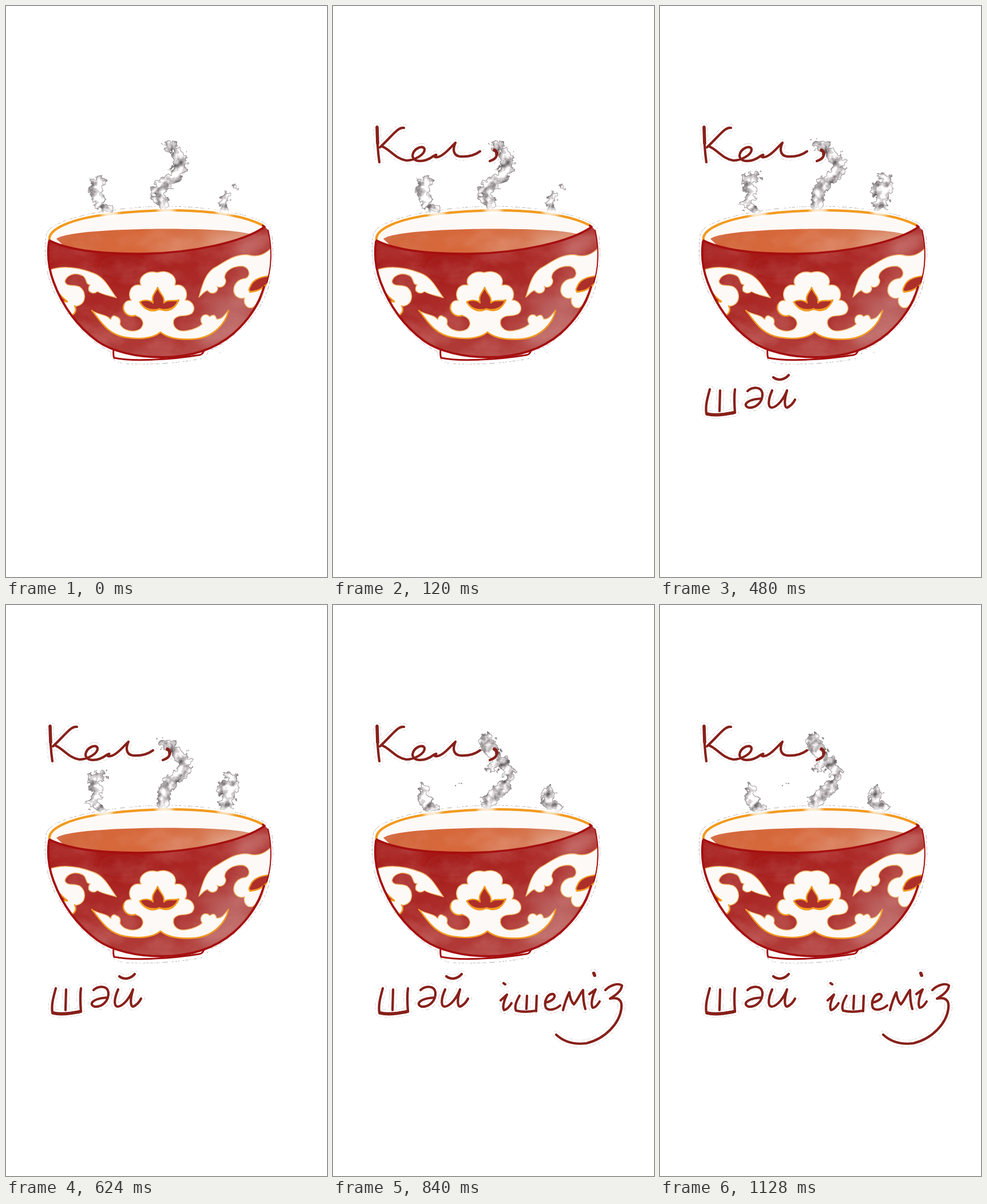
Recreate the animation shown at these times as an HTML page without scripts. Size 561x998 px, loop 1320 ms.

```html
<!DOCTYPE html>
<html lang="kk">
<head>
<meta charset="utf-8">
<title>Кел, шәй ішеміз</title>
<style>
html, body { margin: 0; width: 100%; height: 100%; overflow: hidden; background: #fff; }
svg { display: block; width: 100%; height: 100%; }
path { fill: none; stroke-linecap: round; stroke-linejoin: round; }
.solid path { fill: inherit; }
.ink { stroke: #87201a; stroke-width: 4.2; }
.bold { stroke-width: 5.6; }
.edge { stroke: #bbb3b3; stroke-width: 13.2; }
.gap { stroke: #fff; stroke-width: 12.2; }
.gold { stroke: #f29a1f; stroke-width: 2.4; }
.peach { stroke: #f3b96c; stroke-width: 1.5; }
.rim { stroke: #a50f10; stroke-width: 3.8; }
.steam path { stroke: #aaa; stroke-width: 23; }
.steam .s { stroke-width: 15; }
.steam .m { stroke-width: 28; }
.steam .dot { stroke-width: 4; }

/* hard cuts at 120, 480, 720 and 840 ms */
.p1, .p2, .p3, .p4, .w1, .w2 { animation: 1.32s step-end infinite; }
.p1 { animation-name: p1; }
.p2 { animation-name: p2; }
.p3 { animation-name: p3; }
.p4 { animation-name: from840; }
.w1 { animation-name: from120; }
.w2 { animation-name: from480; }
@keyframes p1 { 0% { opacity: 1 } 36.36%, to { opacity: 0 } }
@keyframes p2 { 0% { opacity: 0 } 36.36% { opacity: 1 } 54.54%, to { opacity: 0 } }
@keyframes p3 { 0% { opacity: 0 } 54.54% { opacity: 1 } 63.63%, to { opacity: 0 } }
@keyframes from120 { 0% { opacity: 0 } 9.09%, to { opacity: 1 } }
@keyframes from480 { 0% { opacity: 0 } 36.36%, to { opacity: 1 } }
@keyframes from840 { 0% { opacity: 0 } 63.63%, to { opacity: 1 } }
</style>
</head>
<body>
<svg viewBox="0 0 561 998" preserveAspectRatio="none" role="img" aria-label="Кел, шәй ішеміз">
<defs>
  <linearGradient id="tea" x1="0" x2="1" y1="0" y2=".15">
    <stop offset="0" stop-color="#d2683d"/><stop offset=".5" stop-color="#d7683a"/>
    <stop offset=".75" stop-color="#d6764f"/><stop offset="1" stop-color="#d6805c"/>
  </linearGradient>
  <linearGradient id="clay" x1=".3" y1="0" x2=".75" y2="1">
    <stop offset="0" stop-color="#a51715"/><stop offset=".45" stop-color="#ab2926"/>
    <stop offset="1" stop-color="#b34441"/>
  </linearGradient>
  <filter id="soft" x="-60%" y="-60%" width="220%" height="220%"><feGaussianBlur stdDeviation="12"/></filter>
  <filter id="haze" x="-60%" y="-90%" width="220%" height="280%"><feGaussianBlur stdDeviation="3"/></filter>
  <filter id="wash" x="0" y="0" width="1" height="1" color-interpolation-filters="sRGB">
    <feTurbulence type="fractalNoise" baseFrequency=".013 .02" numOctaves="5" seed="8"/>
    <feColorMatrix values="0 0 0 0 .94  0 0 0 0 .8  0 0 0 0 .78  1.5 0 0 0 -.62"/>
  </filter>
  <filter id="broken" filterUnits="userSpaceOnUse" x="50" y="190" width="480" height="600">
    <feTurbulence type="fractalNoise" baseFrequency=".3" numOctaves="1" seed="5"/>
    <feColorMatrix values="0 0 0 0 0  0 0 0 0 0  0 0 0 0 0  9 0 0 0 -4.1" result="holes"/>
    <feComposite in="SourceGraphic" in2="holes" operator="in"/>
  </filter>
  <filter id="puff" filterUnits="userSpaceOnUse" x="120" y="190" width="310" height="185" color-interpolation-filters="sRGB">
    <feTurbulence type="fractalNoise" baseFrequency=".12" numOctaves="2" seed="11"/>
    <feColorMatrix values="1 0 0 0 0  0 1 0 0 0  0 0 1 0 0  0 0 0 0 1" result="rough"/>
    <feDisplacementMap in="SourceGraphic" in2="rough" scale="20" xChannelSelector="R" yChannelSelector="G" result="shape"/>
    <feTurbulence type="fractalNoise" baseFrequency=".07" numOctaves="3" seed="4"/>
    <feColorMatrix values="1.5 0 0 0 .08  1.5 0 0 0 .06  1.5 0 0 0 .065  0 0 0 0 1"/>
    <feComposite in2="shape" operator="in" result="cloud"/>
    <feMorphology in="shape" radius="1" result="core"/>
    <feFlood flood-color="#7d7677" flood-opacity=".6"/>
    <feComposite in2="shape" operator="in"/>
    <feComposite in2="core" operator="out" result="line"/>
    <feMerge><feMergeNode in="cloud"/><feMergeNode in="line"/></feMerge>
  </filter>

  <path id="wall" d="M76 410C110 427 170 434 245 433C330 431 415 412 452 386L459 392C463 412 465 436 462 458C456 505 432 545 398 572C362 603 318 614 272 614C228 614 186 604 160 586C122 558 96 518 82 478C74 455 73 430 76 410Z"/>
  <clipPath id="body"><use href="#wall"/></clipPath>
  <path id="surface" d="M88 407C104 394 205 389.500 285 389.500C345 390 405 391 437 401L420 425L245 440L110 428Z"/>
  <clipPath id="liquid"><use href="#surface"/></clipPath>
  <ellipse id="mist" rx="16" ry="6" fill="#fff" opacity=".85" filter="url(#haze)"/>

  <g id="come">
    <path d="M77 211C77 230 78 252 81 273"/>
    <path d="M124 213C113 211 103 228 82 247"/>
    <path d="M85 245C99 250 109 267 128 270C142 270 161 260 160 250C157 242 141 249 139 261C139 274 160 274 176 262Q184 257 178 264C190 267 205 247 214 239C210 248 208 261 222 263C236 264 249 260 257 254"/>
    <path d="M282 251C290 255 288 267 274 271"/>
  </g>
  <g id="tea-word">
    <path d="M87 670C83 685 79 698 81 712C98 717 116 713 131 710"/>
    <path d="M105 672L104 708"/>
    <path d="M131 670C129 684 130 698 131 711"/>
    <path d="M153 673C162 665 177 665 179 677C180 692 168 703 155 702C145 699 148 688 178 686"/>
    <path d="M196 672C190 685 187 701 195 702C206 701 217 685 222 672C217 688 217 701 222 702C229 699 233 694 236 688"/>
    <path d="M198 649C207 656 218 653 225 645"/>
  </g>
  <g id="drink-word">
    <path d="M293 691L304 681C298 692 296 704 299 708C304 707 309 701 312 696"/>
    <path d="M298 661L301 663"/>
    <path d="M326 683C320 693 317 703 320 709C332 712 344 711 355 709"/>
    <path d="M339 683L338 706"/>
    <path d="M356 683L355 710"/>
    <path d="M371 695C385 692 391 684 385 680C374 679 368 694 372 704C377 710 389 707 397 700"/>
    <path d="M402 708C405 696 409 685 413 677C414 686 417 694 421 698C427 692 431 680 437 673C437 685 438 697 441 706"/>
    <path d="M448 680L459 672C453 683 450 699 454 704C459 704 463 698 466 693"/>
    <path d="M455 643L458 648"/>
    <path d="M476 673C485 664 499 660 505 665C504 675 494 682 484 688C498 685 506 690 504 705C501 731 476 758 443 766C420 769 402 762 390 751"/>
  </g>
</defs>

<!-- cut-out edges -->
<g filter="url(#broken)">
  <path stroke="#aaa2a2" stroke-width=".9" d="M70 400Q74 388 90 381C130 362 210 350 285 350C350 351 410 360 447 377Q461 384 464 393C468 430 467 460 459 490C449 528 420 560 390 582Q370 598 354 602Q352 613 340 617C300 624 250 628 205 625Q184 622 182 604C140 584 101 535 82 495C69 465 66 430 70 400Z"/>
  <path stroke="#999" d="M372 606L376 606M375 610L376 611"/>
</g>
<g class="w1"><use href="#come" class="edge" filter="url(#broken)"/><use href="#come" class="gap"/></g>
<g class="w2"><use href="#tea-word" class="edge" filter="url(#broken)"/><use href="#tea-word" class="gap"/></g>
<g class="p4"><use href="#drink-word" class="edge" filter="url(#broken)"/><use href="#drink-word" class="gap"/></g>

<!-- steam -->
<g class="steam">
  <g class="p1" filter="url(#puff)">
    <path d="M163 309C156 313 154 320 158 329"/>
    <path class="s" d="M155 309L165 308M159 328C171 337 155 347 165 349Q175 350 181 357"/>
    <path class="s" d="M283 243L293 247L301 261"/>
    <path d="M303 262C309 278 301 294 288 303Q271 311 266 325"/>
    <path d="M266 322L268 337"/>
    <path class="s" d="M274 338L279 351M383 331L380 356"/>
    <path class="dot" d="M395 314L402 317"/>
  </g>
  <g class="p2" filter="url(#puff)">
    <path class="s" d="M168 297L158 299"/>
    <path d="M156 303L154 309L158 319"/>
    <path class="s" d="M162 323L157 336L149 346L168 357"/>
    <path class="s" d="M274 241L289 246L301 259"/>
    <path d="M306 265C317 275 314 290 301 300Q280 311 278 325"/>
    <path d="M276 330L275 354"/>
    <path class="s" d="M390 299L398 304L396 311L382 313L376 326L392 331L398 322M390 333L379 351L392 346"/>
  </g>
  <g class="p3" filter="url(#puff)">
    <path d="M150 314L147 324L153 330"/>
    <path class="s" d="M143 320L153 339L149 352L164 358"/>
    <path class="s" d="M268 210L270 222"/>
    <path d="M268 224L280 242L293 260"/>
    <path class="m" d="M300 272Q307 290 289 303"/>
    <path d="M286 311L271 331L268 350"/>
    <path class="s" d="M384 319L376 324L382 338L375 352L391 353"/>
  </g>
  <g class="p4" filter="url(#puff)">
    <path class="s" d="M160 319L160 329L153 338L167 344L162 353L178 355"/>
    <path class="m" d="M270 238L272 249"/>
    <path d="M284 265L300 279"/>
    <path class="s" d="M275 284L280 284M301 282L311 295L304 310"/>
    <path d="M301 314L284 331L270 346"/>
    <path d="M376 328L376 335"/>
    <path class="s" d="M373 346L380 349L392 353"/>
    <path class="dot" d="M220 314h.1"/>
  </g>
</g>

<!-- bowl -->
<path style="fill:#fdf9f6" d="M76 410C78 387 140 360 280 358C370 358 425 368 451 385C415 412 330 431 245 433C160 434 100 425 76 410Z"/>
<g clip-path="url(#liquid)">
  <rect x="80" y="385" width="365" height="55" fill="url(#tea)"/>
  <rect x="80" y="385" width="365" height="55" filter="url(#wash)" opacity=".35"/>
  <g fill="#eed0c2" filter="url(#soft)" opacity=".6"><ellipse cx="375" cy="410" rx="28" ry="9"/><ellipse cx="415" cy="398" rx="18" ry="5"/></g>
</g>
<path style="fill:#fffdfc;stroke-width:3" class="rim" d="M188 600Q187 611 189 615C222 622 290 618 338 610Q345 609 347 599"/>

<g clip-path="url(#body)">
  <rect x="65" y="380" width="405" height="240" fill="url(#clay)"/>
  <g filter="url(#soft)">
    <ellipse cx="385" cy="555" rx="62" ry="30" fill="#c47c7a" opacity=".65" transform="rotate(-35 385 555)"/>
    <ellipse cx="435" cy="416" rx="40" ry="12" fill="#cf8f8b" opacity=".7" transform="rotate(-30 435 416)"/>
    <ellipse cx="110" cy="432" rx="34" ry="10" fill="#bd5f5c" opacity=".5"/>
    <ellipse cx="205" cy="455" rx="45" ry="20" fill="#9f0e0e" opacity=".6"/>
    <ellipse cx="375" cy="515" rx="38" ry="15" fill="#c07674" opacity=".6"/>
    <ellipse cx="122" cy="485" rx="28" ry="16" fill="#b85450" opacity=".6"/>
    <ellipse cx="405" cy="470" rx="26" ry="16" fill="#b85450" opacity=".6"/>
  </g>
  <rect x="65" y="380" width="405" height="240" filter="url(#wash)" opacity=".35"/>

  <g class="solid peach" fill="#fdf9f6">
    <path d="M150 532C163 541 175 538 183 548Q186 538 193 543Q202 546 199 556C205 568 224 572 235 564C244 555 238 544 226 541C212 545 202 533 206 522Q210 513 219 515C211 503 218 484 236 488C229 475 245 461 264 466C283 460 301 472 295 488C313 484 320 503 313 514C326 514 333 528 325 537C315 545 300 537 293 549C290 563 303 571 318 567Q334 564 343 556C335 546 347 533 356 543Q365 536 368 547C378 549 383 538 389 532C384 555 363 579 330 582C304 584 283 581 270 570C256 582 230 583 208 579C176 573 165 550 150 532Z"/>
    <path d="M70 464C96 452 127 457 153 467C174 475 182 496 193 510C182 506 169 505 160 499Q152 505 145 498Q143 492 147 487C138 488 142 474 133 471C121 465 106 470 103 481C105 492 119 486 129 491C140 499 140 516 130 522Q122 526 120 524C126 535 116 543 107 542L90 530Z"/>
    <path d="M468 418C454 435 440 440 423 435C397 433 379 450 362 459C347 470 343 489 337 509C344 503 346 499 352 497Q359 505 367 500Q372 495 369 490C378 496 389 483 382 475C382 462 399 453 415 455C426 459 428 471 419 476C406 477 397 486 398 499C400 509 410 513 417 510C414 520 421 530 431 527C441 520 449 505 466 482Z"/>
  </g>
  <g class="solid gold" fill="#ad2f2a">
    <path d="M234 517C243 512 253 515 257 519C253 506 261 502 265 492C269 504 278 507 276 519C282 512 293 517 302 514C296 528 285 533 268 530C252 533 240 528 234 517Z"/>
    <path d="M82 499C92 498 97 510 107 516Q99 518 92 513Z"/>
    <path d="M465 471C448 473 432 476 427 490Q421 500 431 499Q446 498 460 482Z"/>
  </g>
  <path class="gold" d="M389 532C384 555 363 579 330 582C304 584 283 581 270 570C256 582 230 583 208 579C176 573 165 550 150 532M234 518C243 533 258 536 268 529C281 536 294 532 301 515M92 515L107 517M426 500Q442 499 452 489M206 522C202 533 212 545 226 541M120 524C126 535 116 543 107 542"/>
</g>

<!-- outlines -->
<path class="gold" style="stroke-width:4.2" d="M76 409C73 390 115 371 180 364C270 353 388 353 448 383"/>
<path class="rim" d="M76 410C110 427 170 434 245 433C330 431 415 412 452 386L449 384"/>
<path class="rim" d="M75 412C72 435 74 458 83 482C97 520 122 558 160 586C186 604 228 614 272 614C318 614 362 603 398 572C424 549 442 521 451 491"/>
<path class="rim" style="stroke-width:2" d="M458 392C463 412 464 432 462 453Q460 470 456 483"/>

<!-- vapour over the rim -->
<g class="p1"><use href="#mist" x="182" y="364"/><use href="#mist" x="280" y="358"/><use href="#mist" x="382" y="361"/></g>
<g class="p2"><use href="#mist" x="172" y="365"/><use href="#mist" x="277" y="358"/><use href="#mist" x="385" y="361"/></g>
<g class="p3"><use href="#mist" x="160" y="367"/><use href="#mist" x="268" y="358"/><use href="#mist" x="384" y="361"/></g>
<g class="p4"><use href="#mist" x="174" y="365"/><use href="#mist" x="268" y="358"/><use href="#mist" x="382" y="361"/></g>

<!-- lettering -->
<g class="w1 ink"><use href="#come"/><path class="bold" d="M77 212L78 240M282 252Q287 254 286 259"/></g>
<g class="w2 ink"><use href="#tea-word"/><path class="bold" d="M82 713Q98 717 128 711"/></g>
<g class="p4 ink"><use href="#drink-word"/><path class="bold" d="M456 644L457 647"/></g>
</svg>
</body>
</html>
```
